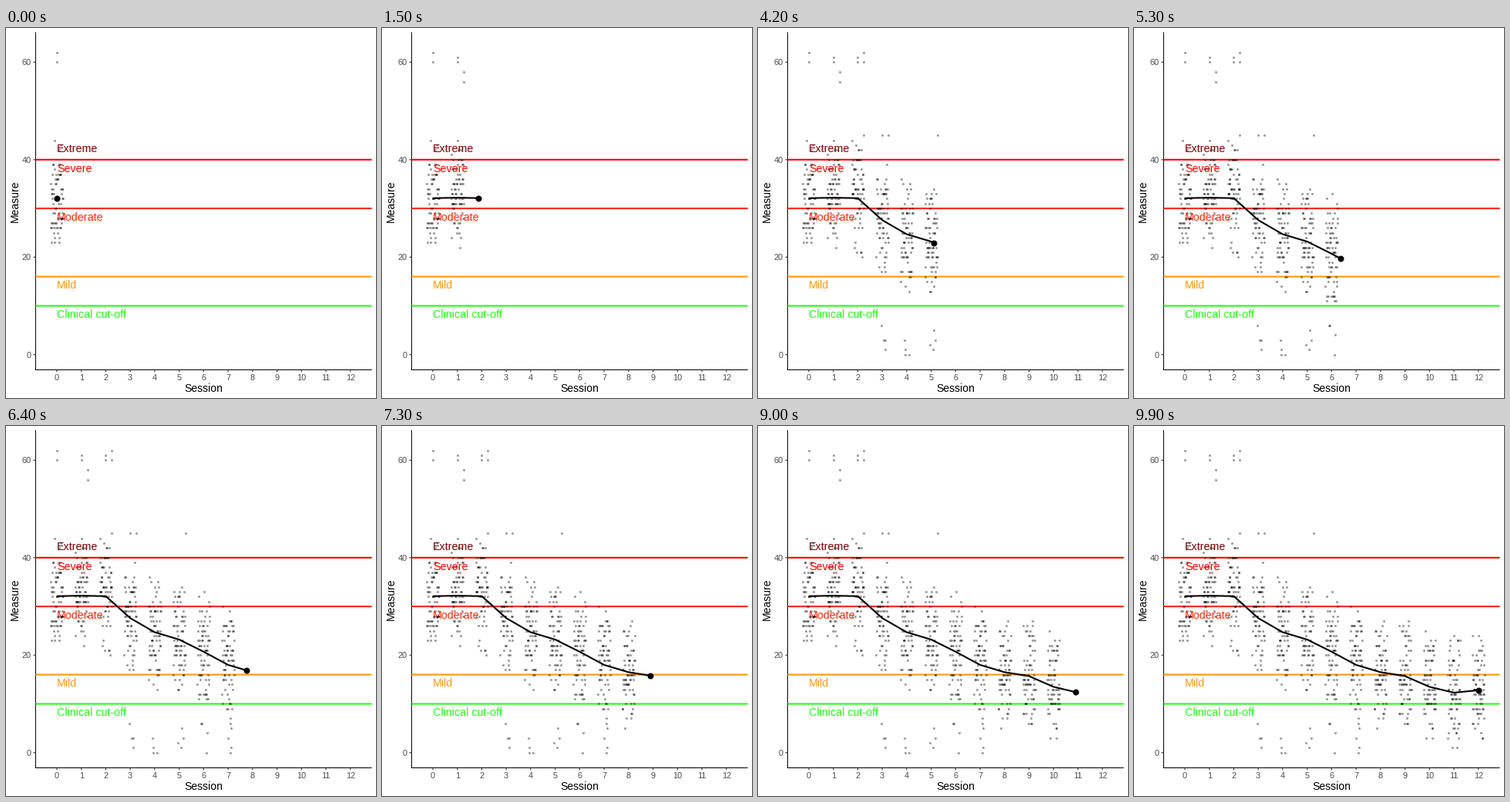
A matplotlib script for the animation above (10 s loop, 480 by 480 pixels).

```python
import numpy as np
import matplotlib.pyplot as plt
from matplotlib.animation import FuncAnimation

plt.rcParams["font.family"] = "Liberation Sans"
FRAMES, SESSIONS, PEOPLE = 100, 13, 72
PX = 0.72  # points per pixel at 100 dpi
STEPS = np.arange(SESSIONS)
MEANS = np.array([32.1, 32.2, 32.1, 27.6, 24.7, 23.2, 20.7,
                  18.0, 16.5, 15.7, 13.5, 12.3, 12.8])


def sx(session):
    return 66 + 31.73 * np.asarray(session)


def sy(value):
    return 423.7 - 6.322 * np.asarray(value)


fig = plt.figure(figsize=(4.8, 4.8), dpi=100, facecolor="white")
ax = fig.add_axes([0, 0, 1, 1])
ax.set_xlim(0, 480)
ax.set_ylim(480, 0)
ax.axis("off")


def stroke(xs, ys, color, width, z=1):
    return ax.plot(xs, ys, color=color, lw=width * PX, zorder=z, snap=False,
                   solid_capstyle="butt", solid_joinstyle="round")[0]


def label(x, y, text, size, color, ha="center", **kw):
    ax.text(x, y, text, fontsize=size * PX, color=color, ha=ha,
            va="baseline", zorder=2, **kw)


# Axes
stroke([38.4, 38.4], [5.5, 444], "black", 1.07)
stroke([38, 474.5], [443.4, 443.4], "black", 1.07)
for v in range(0, 61, 20):
    stroke([35.5, 38.4], [sy(v)] * 2, "#333333", 1.07)
    label(33, sy(v) + 4, str(v), 11, "#4d4d4d", "right")
for s in STEPS:
    stroke([sx(s)] * 2, [443.4, 446.4], "#333333", 1.07)
    label(sx(s), 457, str(s), 11, "#4d4d4d")
label(256.3, 472, "Session", 14, "black")
label(16, 224.5, "Measure", 14, "black", rotation=90, rotation_mode="anchor")

# Severity thresholds, each named just below its line
for v, text, color in ((44, "Extreme", "#7a0002"), (40, "Severe", "#ff0000"),
                       (30, "Moderate", "#ff2a00"), (16, "Mild", "#ff9810"),
                       (10, "Clinical cut-off", "#21ff12")):
    if text != "Extreme":
        stroke([38.4, 474.5], [sy(v)] * 2, color, 2.1)
    label(66, sy(v - 2) + 3.2, text, 14.2, color, "left")

# Each person keeps an offset and a tendency around the session mean
rng = np.random.default_rng(12)
offset = rng.permutation(np.linspace(-.25, .25, PEOPLE))
trait = rng.uniform(-1, 1, PEOPLE)


def session_scores(s):
    noise = rng.uniform(-1, 1, PEOPLE)
    scores = np.clip(np.rint(MEANS[s] + 6.3 * (trait + noise)), 0, None)
    points = list(zip(s + offset, scores))
    if s < 3:  # two very high scorers, joined by two more later
        points += [(s, 62 - (s > 0)), (s, 60)]
        if s:
            points += [(s + .25, 54 + 4 * s), (s + .25, 52 + 4 * s)]
    elif s < 8:  # early responders
        points += zip(s + rng.uniform(-.12, .2, 4), rng.integers(0, 7, 4))
    points += [(x, 45) for x in (2.25, 3, 3.25, 5.25) if int(x) == s]
    return np.array(points).T


clouds = []
for s in STEPS:
    xs, ys = session_scores(s)
    clouds.append(ax.scatter(sx(xs), sy(ys), s=(3.1 * PX) ** 2, c="black",
                             alpha=.38, linewidths=0, zorder=3))

trend = stroke([], [], "black", 2.1, 4)
head, = ax.plot([], [], "o", color="black", ms=8 * PX, mew=0, zorder=5,
                snap=False)

# Sessions land on whole frames; the trend moves linearly between them
KEYS = np.rint(STEPS * (FRAMES - 1) / (SESSIONS - 1))


def draw(i):
    now = np.interp(i, KEYS, STEPS)
    level = np.interp(now, STEPS, MEANS)
    past = STEPS[:int(now) + 1]
    trend.set_data(sx(np.append(past, now)), sy(np.append(MEANS[past], level)))
    head.set_data([sx(now)], [sy(level)])
    for key, cloud in zip(KEYS, clouds):
        cloud.set_visible(i >= key)
    return [trend, head, *clouds]


anim = FuncAnimation(fig, draw, frames=FRAMES, interval=100, repeat=True,
                     repeat_delay=0, blit=False)
plt.show()
```
